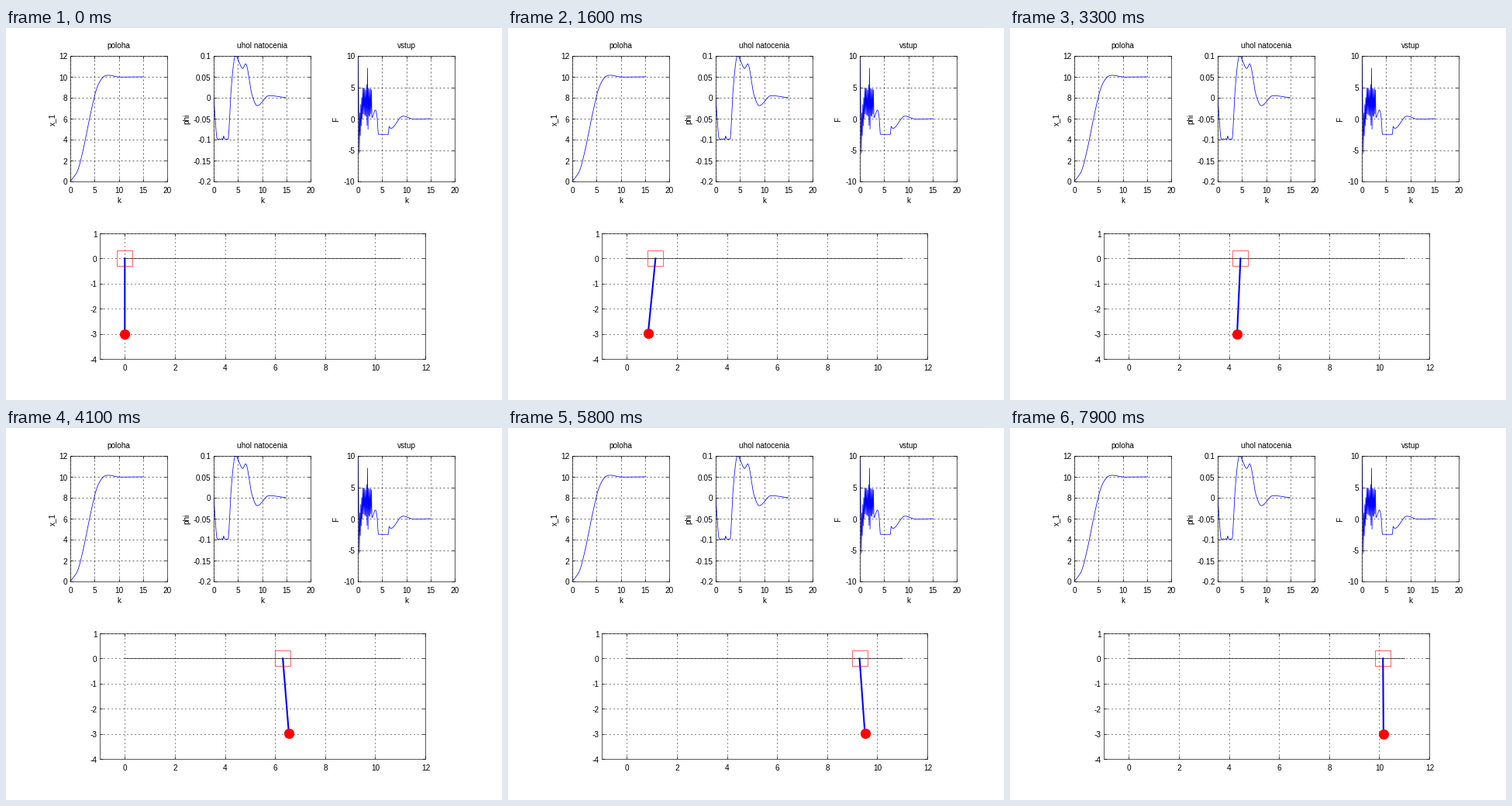
Recreate the animation shown at these times as a matplotlib script. Size 640x480 px, loop 8000 ms.

```python
import numpy as np
import matplotlib.pyplot as plt
from matplotlib.animation import FuncAnimation

W, H, DPI = 640, 480, 100
PX = 72 / DPI  # points per pixel
THIN = 0.65 * PX
FRAMES, STEP = 80, 100

plt.rcParams.update({
    "font.family": "Liberation Sans",
    "font.size": 10 * PX,
    "axes.linewidth": THIN,
    "lines.dash_capstyle": "butt",
    "lines.scale_dashes": False,
})


def smooth(points, t):
    """Cubic Hermite curve through the points, flat at local extremes."""
    p, v = np.array(points, float).T
    h, d = np.diff(p), np.diff(v) / np.diff(p)
    m = np.gradient(v, p)
    m[1:-1] = np.where(d[:-1] * d[1:] > 0, m[1:-1], 0)
    i = np.clip(np.searchsorted(p, t, side="right") - 1, 0, len(h) - 1)
    s = (t - p[i]) / h[i]
    return (v[i] * (1 + 2 * s) * (1 - s) ** 2 + v[i + 1] * s * s * (3 - 2 * s)
            + h[i] * (m[i] * s * (1 - s) ** 2 - m[i + 1] * s * s * (1 - s)))


def bump(t, centre, width):
    return np.exp(-((t - centre) / width) ** 2)


def position(t):
    return smooth([(0, 0), (0.4, 0.24), (1.6, 1.145), (2.7, 3.12),
                   (4.1, 6.31), (5.4, 8.82), (6.6, 9.89), (7.9, 10.15),
                   (10.2, 9.98), (15, 10)], t)


def angle(t):
    base = smooth([(0, 0), (0.75, -0.099), (2.95, -0.099), (3.6, 0.02),
                   (4.5, 0.1), (6, 0.07), (6.6, 0.081), (7.9, 0.007),
                   (9, -0.019), (11.4, 0.005), (15, 0)], t)
    ripple = 0.0015 * np.sin(12 * t) * bump(t, 1.8, 0.9)
    return base + ripple + 0.008 * bump(t, 2.05, 0.1)


def force():
    """Opening kick, chattering control, then a settled tail."""
    n = np.arange(4, 29)
    chatter_t = n / 10
    mean = np.interp(chatter_t, [0.3, 1], [-2, 2.6])
    size = 2.3 + 3.2 * bump(chatter_t, 2, 0.15)
    rng = np.random.default_rng(4)
    chatter = mean + (-1.0) ** n * size * rng.uniform(0.75, 1, len(n))
    tail_t = np.linspace(2.9, 15, 243)
    tail = smooth([(2.9, 0.2), (4, 0), (4.25, -2.5), (6.3, -2.5),
                   (6.45, -1.25), (6.8, -1.55), (9.3, 0.4), (11.6, -0.08),
                   (15, 0)], tail_t)
    return (np.concatenate([[0, 0.05, 0.3], chatter_t, tail_t]),
            np.concatenate([[0, 9.4, -5.5], chatter, tail]))


fig = plt.figure(figsize=(W / DPI, H / DPI), dpi=DPI, facecolor="white")


def put(x, y, text, ha="center", **kw):
    kw.setdefault("va", "baseline")
    fig.text(x / W, 1 - y / H, text, ha=ha, **kw)


def panel(left, top, right, bottom, xticks, yticks, xlim, dash, width):
    """Boxed axes given by pixel edges, with grid, inner ticks and numbers."""
    ax = fig.add_axes([left / W, 1 - bottom / H,
                       (right - left) / W, (bottom - top) / H])
    ax.set_axisbelow(True)
    ax.grid(True, color="black", linewidth=width * PX,
            linestyle=(0, tuple(d * PX for d in dash)))
    ax.tick_params(direction="in", top=True, right=True, length=4 * PX,
                   width=THIN, labelbottom=False, labelleft=False)
    ax.set_xticks(xticks)
    ax.set_yticks(yticks)
    ylim = yticks[0], yticks[-1]
    ax.set(xlim=xlim, ylim=ylim)
    for v in yticks:
        y = np.interp(v, ylim, (bottom, top))
        put(left - 3.5, y + 4.5, f"{v:g}", "right")
    for v in xticks:
        put(np.interp(v, xlim, (left, right)) + 0.5, bottom + 15, f"{v:g}")
    return ax


def plot_panel(left, title, label, label_x, yticks, t, values):
    ax = panel(left, 36, left + 125, 198, range(0, 21, 5), yticks, (0, 20),
               (2, 3), 0.6)
    ax.plot(t, values, color="blue", linewidth=0.75 * PX)
    mid = left + 62.5
    put(mid, 26, title)
    put(mid, 226, "k")
    put(label_x, 117.5, label, va="center", rotation=90)


time = np.linspace(0, 15, 301)
plot_panel(83, "poloha", "x_1", 60, range(0, 13, 2), time, position(time))
plot_panel(268, "uhol natocenia", "phi", 233.5,
           [v / 20 for v in range(-4, 3)], time, angle(time))
plot_panel(454, "vstup", "F", 426.5, range(-10, 11, 5), *force())

stage = panel(121, 265, 541, 427, range(0, 13, 2), range(-4, 2), (-1, 12),
              (1, 4), 0.9)
stage.plot([0, 11], [0, 0], color="black", linewidth=THIN)
cart, = stage.plot([], [], "s", ms=20 * PX, mfc="none", mec="red",
                   mew=0.6 * PX, snap=False)
rod, = stage.plot([], [], color="blue", linewidth=2.1 * PX, snap=False)
bob, = stage.plot([], [], "o", ms=13.2 * PX, color="red", mew=0, snap=False)


def draw(frame):
    t = frame * STEP / 1000
    x, phi = position(t), angle(t)
    bx, by = x + 3 * np.sin(phi), -3 * np.cos(phi)
    cart.set_data([x], [0])
    rod.set_data([x, bx], [0, by])
    bob.set_data([bx], [by])
    return cart, rod, bob


anim = FuncAnimation(fig, draw, frames=FRAMES, interval=STEP,
                     repeat=True, repeat_delay=0)
plt.show()
```
